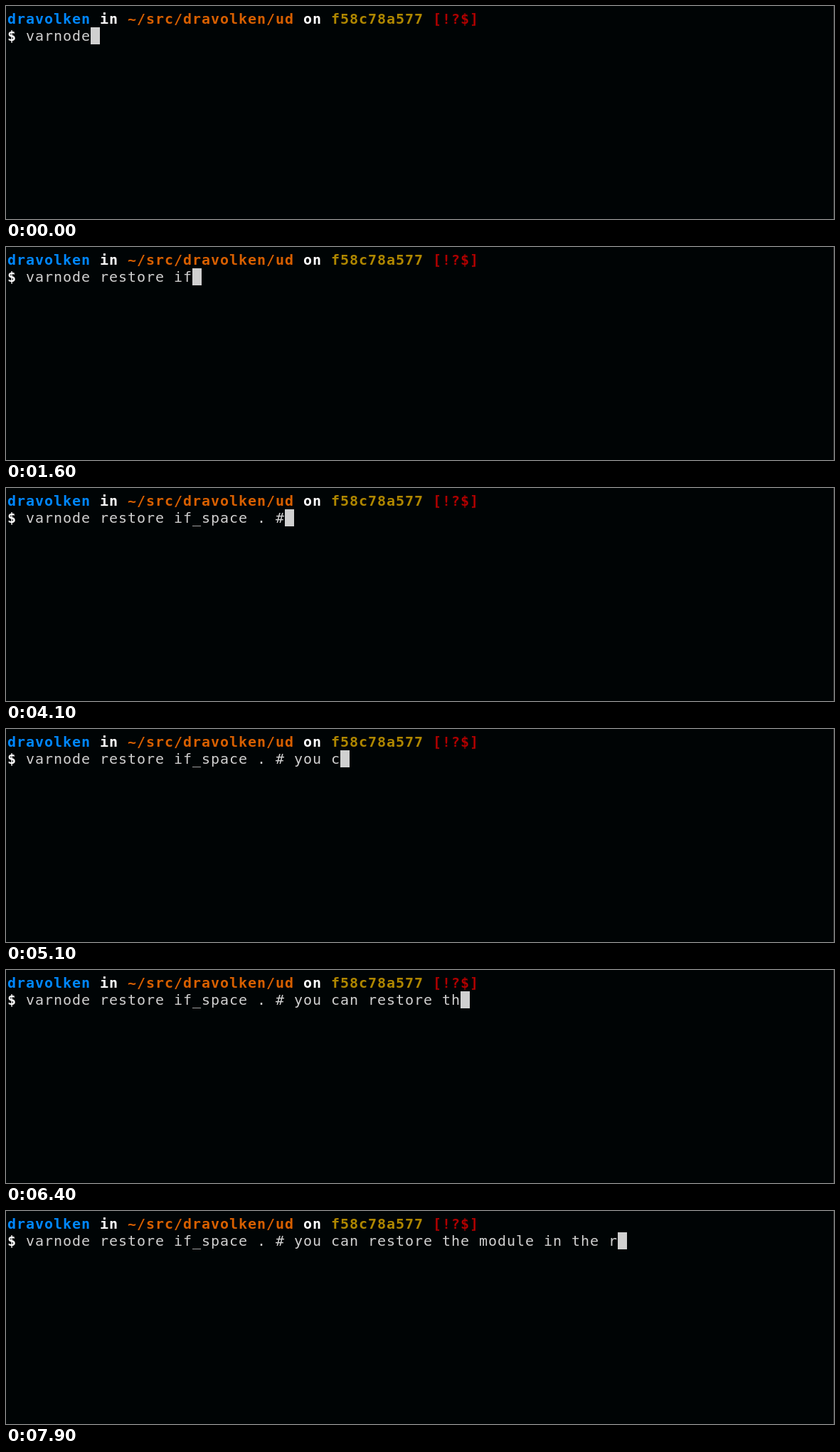
Recreate the animation shown at these times as an HTML page with a canvas. Size 1164 by 300 pixels, loop 8 s.

```html
<!DOCTYPE html>
<html lang="en">
<head>
<meta charset="utf-8">
<title>Terminal session</title>
<style>
  html, body { margin: 0; width: 100%; height: 100%; overflow: hidden; background: #000405; }
  canvas { display: block; }
</style>
</head>
<body>
<canvas id="stage" width="1164" height="300"></canvas>
<script>
// An opaque canvas allows subpixel text smoothing, as in a terminal
const ctx = document.getElementById('stage').getContext('2d', { alpha: false });

const LOOP = 8000, TICK = 100;
const CELL_W = 13, CELL_H = 24, LEFT = 2, TOP = 6, ASCENT = 19;
const FONT = '20px "DejaVu Sans Mono", monospace';
const BACK = '#000405', FORE = '#d0d0d0', WHITE = '#ffffff', EDGE = '#333333';

const PROMPT = [
  ['dravolken', '#0087ff'],
  [' in ', WHITE],
  ['~/src/dravolken/ud', '#d75f00'],
  [' on ', WHITE],
  ['f58c78a577', '#af8700'],
  [' [!?$]', '#af0000']
];
const COMMAND = 'varnode restore if_space . # you can restore the module in the r';

// Typing pace: time and characters typed, steady in between
const PACE = [[0, 7], [1600, 18], [2600, 25], [3400, 25], [4100, 28], [4500, 28], [7100, 54], [7900, 64]];

function typedCount(time) {
  const now = Math.floor(time / TICK) * TICK;
  const next = PACE.findIndex(([at]) => at > now);
  if (next < 0) return COMMAND.length;
  const [t0, n0] = PACE[next - 1], [t1, n1] = PACE[next];
  return Math.round(n0 + (n1 - n0) * (now - t0) / (t1 - t0));
}

// Draws text on the character grid and returns the next column
function write(text, col, row, color, bold) {
  ctx.font = (bold ? 'bold ' : '') + FONT;
  ctx.fillStyle = color;
  for (const char of text) {
    ctx.fillText(char, LEFT + col * CELL_W, TOP + row * CELL_H + ASCENT);
    col++;
  }
  return col;
}

function fillBox(color, x, y, w, h) {
  ctx.fillStyle = color;
  ctx.fillRect(x, y, w, h);
}

function draw(time) {
  fillBox(BACK, 0, 0, 1164, 300);
  fillBox(EDGE, 1163, 0, 1, 300);

  let col = 0;
  for (const [text, color] of PROMPT) col = write(text, col, 0, color, true);

  col = write('$ ', 0, 1, WHITE, true);
  col = write(COMMAND.slice(0, typedCount(time)), col, 1, FORE, false);
  fillBox(FORE, LEFT + col * CELL_W, TOP + CELL_H, CELL_W, CELL_H);
}

const begin = performance.now();
function frame() {
  draw((performance.now() - begin) % LOOP);
  requestAnimationFrame(frame);
}
frame();
</script>
</body>
</html>
```
